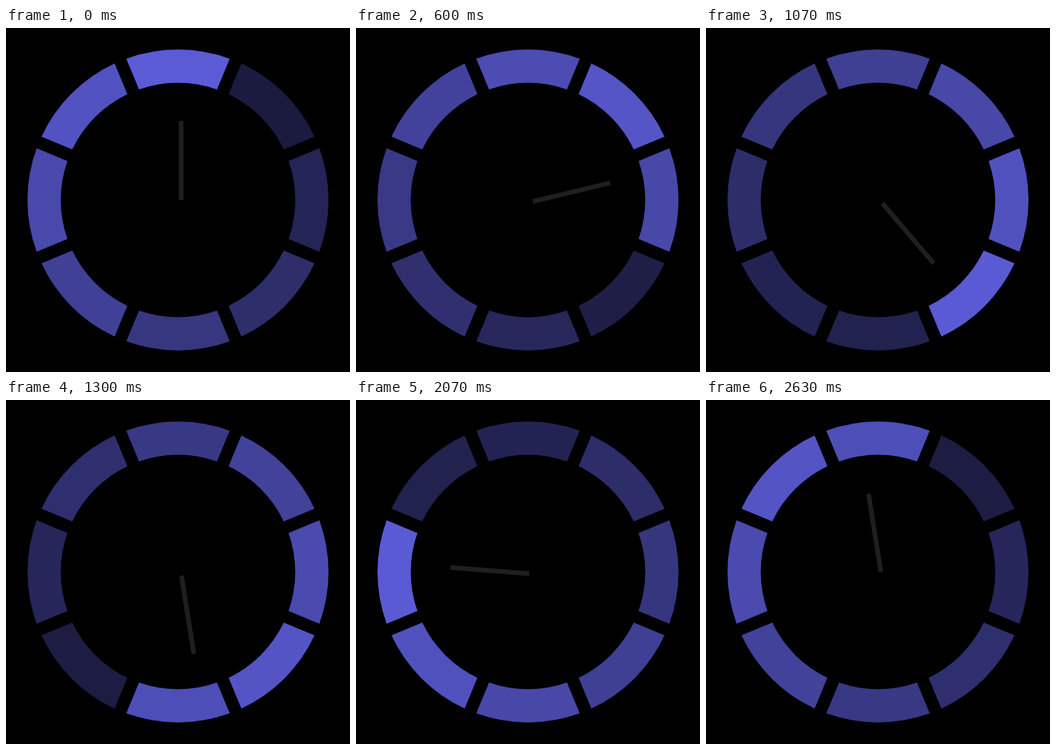
Write an HTML page with a canvas that moves like this. It is 512 px wide and 512 px high and loops after 2.7 s.

```html
<!DOCTYPE html>
<html lang="en">
<head>
<meta charset="utf-8">
<title>Segmented dial</title>
<style>
  html, body { margin: 0; width: 100%; height: 100%; overflow: hidden; background: #000; }
  canvas { display: block; width: 512px; height: 512px; }
</style>
</head>
<body>
<canvas id="stage" width="512" height="512"></canvas>
<script>
const ctx = document.getElementById('stage').getContext('2d');

const LOOP = 2700;
const TICK = 100 / 3;
const STEPS = 80;
const LAST_STEP = 78;

const SEGMENTS = 8;
const STEPS_PER_SEGMENT = STEPS / SEGMENTS;
const FADE_STEPS = STEPS - STEPS_PER_SEGMENT;
const MIN_LIGHT = 0.3;
const RING = { x: 256, y: 256, inner: 174.5, outer: 224, halfGap: 9.4, color: [91, 91, 214] };
const HAND = { x: 260.7, y: 258.7, from: 2.7, to: 120.6, width: 7, color: '#1f1f22' };

// Ticks land on 10 ms boundaries; the first and last poses are held.
function stepAt(time) {
  const t = Math.floor((time % LOOP) / 10) * 10;
  const tick = Math.floor((t + 3.4) / TICK);
  return Math.min(Math.max(tick - 1, 0), LAST_STEP);
}

// Slow linear fade after the hand passes, quick linear rise before it returns.
function lightOf(index, step) {
  const age = (step - index * STEPS_PER_SEGMENT + STEPS) % STEPS;
  const level = age <= FADE_STEPS
    ? 1 - age / FADE_STEPS
    : (age - FADE_STEPS) / STEPS_PER_SEGMENT;
  return MIN_LIGHT + (1 - MIN_LIGHT) * level;
}

function drawSegment(index, light) {
  const { x, y, inner, outer, halfGap, color } = RING;
  const middle = index * 2 * Math.PI / SEGMENTS - Math.PI / 2;
  const spread = radius => Math.PI / SEGMENTS - Math.asin(halfGap / radius);
  const a = spread(outer);
  const b = spread(inner);
  ctx.beginPath();
  ctx.arc(x, y, outer, middle - a, middle + a);
  ctx.arc(x, y, inner, middle + b, middle - b, true);
  ctx.closePath();
  ctx.fillStyle = `rgb(${color.map(c => Math.round(c * light)).join(',')})`;
  ctx.fill();
}

function drawHand(step) {
  ctx.save();
  ctx.translate(HAND.x, HAND.y);
  ctx.rotate(step / STEPS * 2 * Math.PI);
  ctx.fillStyle = HAND.color;
  ctx.fillRect(-HAND.width / 2, -HAND.to, HAND.width, HAND.to - HAND.from);
  ctx.restore();
}

function draw(time) {
  const step = stepAt(time);
  ctx.fillStyle = '#000';
  ctx.fillRect(0, 0, 512, 512);
  for (let i = 0; i < SEGMENTS; i++) drawSegment(i, lightOf(i, step));
  drawHand(step);
}

const start = performance.now();
function loop() {
  draw(performance.now() - start);
  requestAnimationFrame(loop);
}
loop();
</script>
</body>
</html>
```
